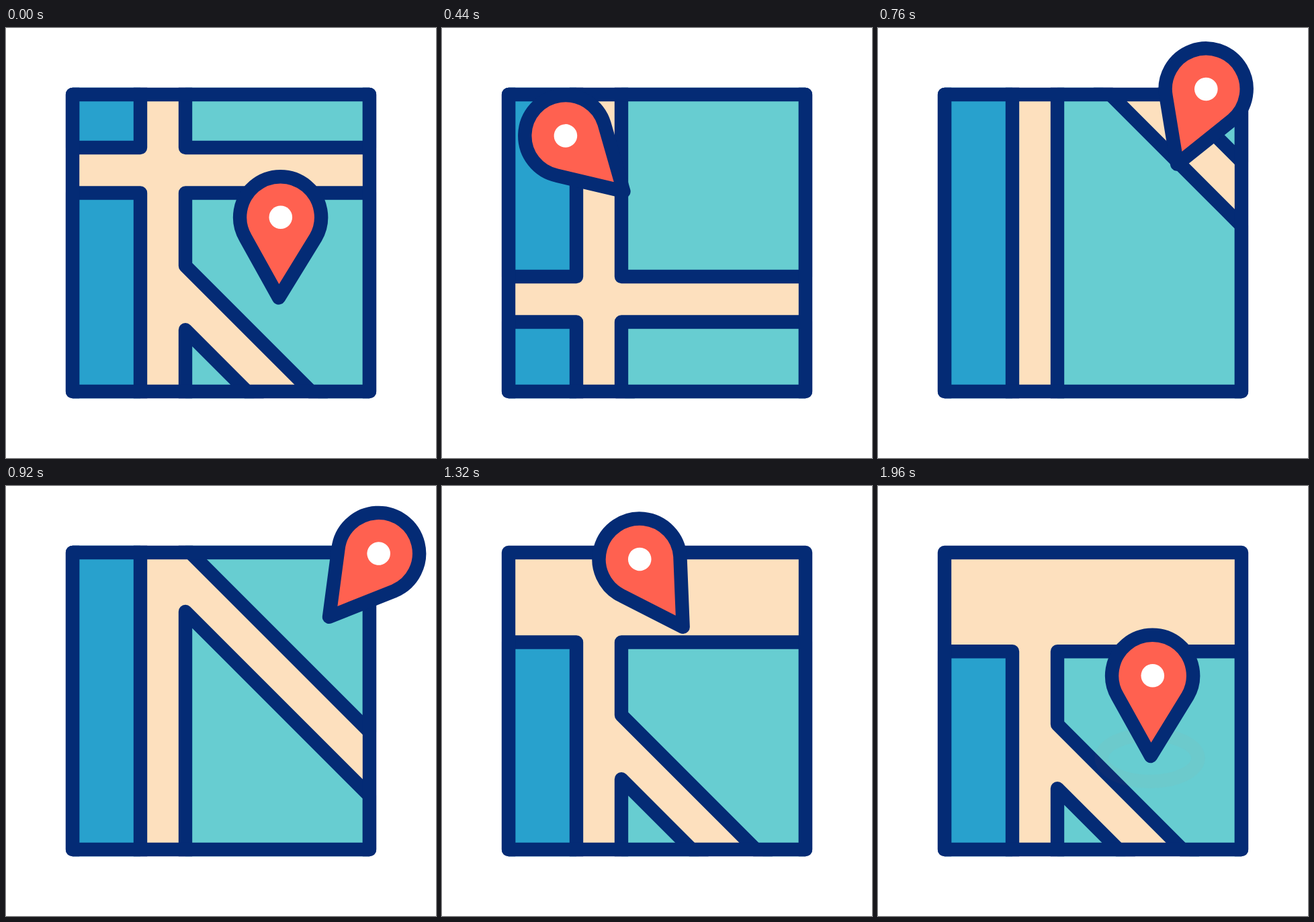
An HTML page for the animation above (2 s loop, 640 by 640 pixels).

```html
<!DOCTYPE html>
<html lang="en">
<head>
<meta charset="utf-8">
<title>Map pin</title>
<style>
  html, body { margin: 0; width: 100%; height: 100%; overflow: hidden; background: #fff; }
  svg { display: block; width: 100vw; height: 100vh; }
  .line { stroke: #042b75; stroke-width: 20.4; stroke-linejoin: round; stroke-linecap: round; }
  .blue { fill: #28a1cd; }
  .teal { fill: #67cdd1; }
</style>
</head>
<body>
<svg viewBox="0 0 640 640">
  <defs>
    <clipPath id="sheet"><rect x="88.8" y="88.8" width="462.4" height="462.4" rx="10.2"/></clipPath>
    <g id="blocks" class="line">
      <path class="blue" d="M99 245.5H200V1127H99Z"/>
      <path class="teal" d="M267 245.5H541V628L267 354Z"/>
      <path class="teal" d="M267 449.3L541 723.3V1127H267Z"/>
    </g>
  </defs>
  <g clip-path="url(#sheet)">
    <rect x="99" y="99" width="442" height="442" fill="#fde0be"/>
    <g id="map">
      <use href="#blocks"/>
      <use href="#blocks" y="-949"/>
    </g>
  </g>
  <rect class="line" x="99" y="99" width="442" height="442" fill="none"/>
  <ellipse id="ripple" cx="404.5" cy="405" fill="none" stroke="#ff6150" stroke-width="20.4"/>
  <g id="pin">
    <path class="line" fill="#ff6150" d="M0 0L-49.5 -89A60.5 60.5 0 1 1 55 -89.5Z"/>
    <circle cx="2.8" cy="-119.7" r="17.3" fill="#fff"/>
  </g>
</svg>
<script>
const LOOP = 2000;
const LAND = 1460;
const [map, ripple, pin] = ["map", "ripple", "pin"].map(id => document.getElementById(id));

// cubic-bezier(.4, 0, .6, 1)
function ease(x) {
  if (x <= 0) return 0;
  if (x >= 1) return 1;
  let lo = 0, hi = 1;
  for (let i = 0; i < 24; i++) {
    const p = (lo + hi) / 2, q = 1 - p;
    if (1.2 * q * q * p + 1.8 * q * p * p + p * p * p < x) lo = p;
    else hi = p;
  }
  return lo * lo * (3 - 2 * lo);
}

const between = (t, start, end) => ease((t - start) / (end - start));

// Eased track through [time, value] keys
function track(t, keys) {
  let value = keys[0][1];
  for (let i = 1; i < keys.length; i++) {
    const [start, from] = keys[i - 1], [end, to] = keys[i];
    if (t >= start) value = from + (to - from) * between(t, start, end);
  }
  return value;
}

const swayKeys = [[0, 406], [330, 253], [920, 481], [1290, 355], [LAND, 406]];
const tiltKeys = [[0, 0], [365, -51], [930, 36.7], [1300, -35.2], [LAND, 0]];

function pinHeight(t) {
  const top = 190.5, ground = 402;
  const rise = top + (ground - top) * Math.max(0, 1 - t / 1440) ** 3.8;
  return rise + (ground - rise) * between(t, 1285, LAND);
}

function draw(t) {
  map.setAttribute("transform", `translate(0 ${949.8 * between(t, 0, 1440)})`);

  const x = track(t, swayKeys), tilt = track(t, tiltKeys);
  pin.setAttribute("transform", `translate(${x} ${pinHeight(t)}) rotate(${tilt})`);

  const radius = 72 * between(t, 1440, 1960);
  ripple.setAttribute("rx", radius);
  ripple.setAttribute("ry", radius * 0.485);
  ripple.setAttribute("opacity", radius > 0 ? 1 - between(t, 1540, 2020) : 0);
}

function tick() {
  draw(performance.now() % LOOP);
  requestAnimationFrame(tick);
}
tick();
</script>
</body>
</html>
```
